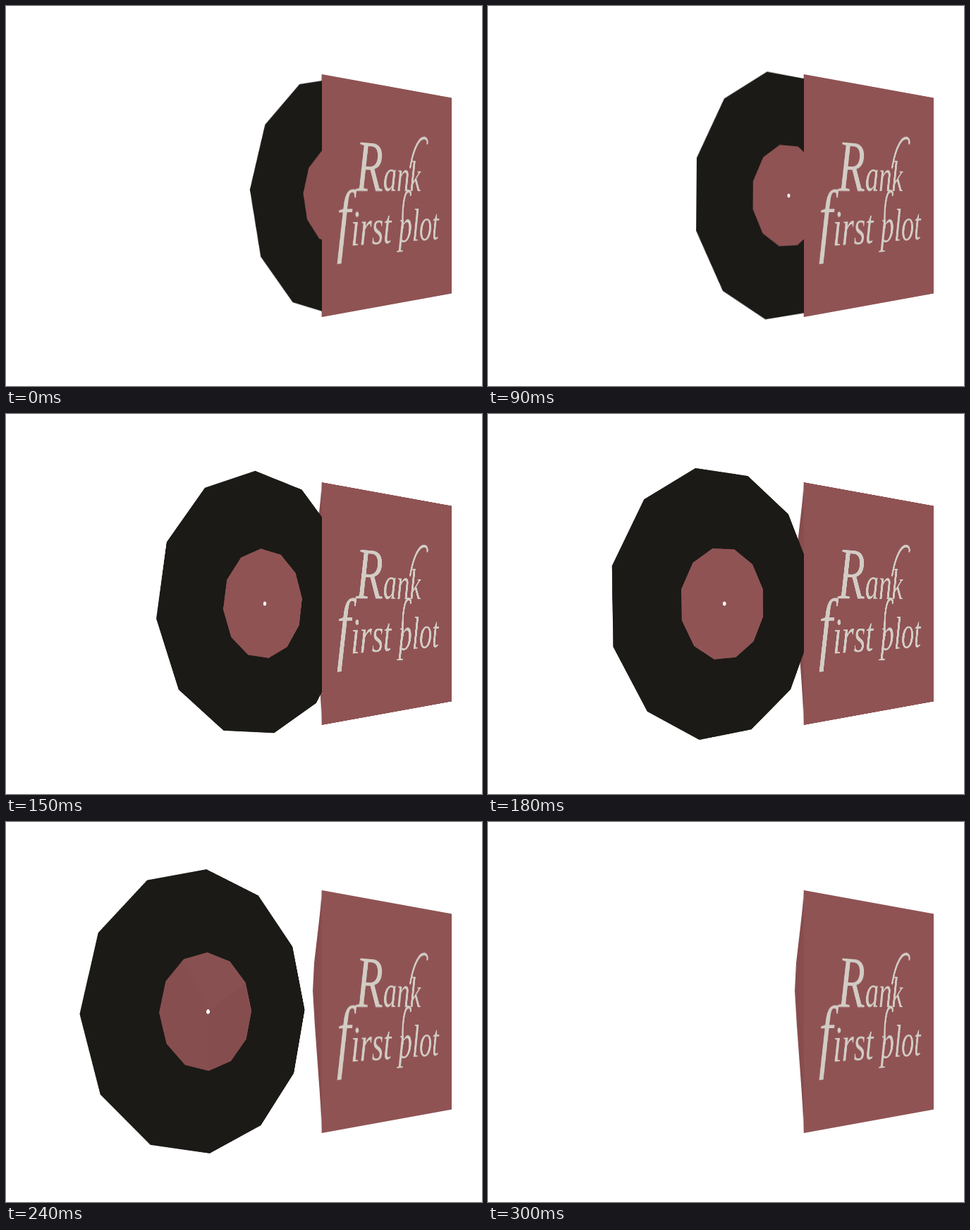
An HTML page that plays this animation: 675x540 px, repeating every 360 ms.

```html
<!DOCTYPE html>
<html lang="en">
<head>
<meta charset="utf-8">
<title>Record sleeve</title>
<style>
  html, body { margin: 0; width: 100%; height: 100%; overflow: hidden; background: #fff; }
  svg { position: absolute; left: 0; top: 0; overflow: visible; }
  /* sleeve and record share one square plane seen in perspective */
  #plane {
    transform-origin: 0 0;
    transform: matrix3d(.9749, .1883, 0, .0006986, 0, 1, 0, 0, 0, 0, 1, 0, 448, 97, 0, 1);
  }
  text { font: italic 76px "Liberation Serif", "Times New Roman", serif; fill: #d2ccc4; }
  .swash { fill: none; stroke: #d2ccc4; stroke-width: 4.5; stroke-linecap: round; }
</style>
</head>
<body>
<svg width="675" height="540">
  <path d="M449 97L437 200L435 240L438 290L449 442Z" fill="#884e4f"/>
  <path d="M448 97L441 200L439 240L442 290L448 442" fill="none" stroke="#7f4748" stroke-opacity=".5"/>
</svg>
<svg id="plane" width="345" height="345">
  <g id="disc">
    <polygon id="vinyl" fill="#1b1a16"/>
    <polygon id="label" fill="#8f5354"/>
    <g id="shade"></g>
    <circle r="2.8" fill="#fff"/>
  </g>
  <rect width="345" height="345" fill="#8f5354"/>
  <text x="76" y="165" font-size="72"><tspan style="font-size:112px">R</tspan><tspan style="font-size:72px">ank</tspan></text>
  <path class="swash" d="M218 126C228 92 246 74 262 76Q270 78 268 84"/>
  <text x="32" y="247"><tspan style="font-size:118px">f</tspan>irst plot</text>
  <path class="swash" d="M197 224C195 192 201 166 213 165Q220 165 219 171"/>
</svg>
<script>
  const $ = id => document.getElementById(id);
  const STEP = 30, LOOP = 360, TRAVEL = 9;

  // corners of a regular twelve-sided shape, clockwise from the top
  function corners(r, from = 0, to = 11) {
    const list = [];
    for (let k = from; k <= to; k++) {
      const a = k * Math.PI / 6;
      list.push((r * Math.sin(a)).toFixed(2) + ',' + (-r * Math.cos(a)).toFixed(2));
    }
    return list.join(' ');
  }

  $('vinyl').setAttribute('points', corners(172.5));
  $('label').setAttribute('points', corners(72));
  $('shade').innerHTML = [[0, 1, .11], [1, 4, .07], [4, 8, .13], [8, 12, .1]]
    .map(([a, b, o]) => `<polygon points="0,0 ${corners(72, a, b)}" fill-opacity="${o}"/>`)
    .join('');

  function draw() {
    const step = Math.floor(performance.now() % LOOP / STEP);
    const u = Math.min(step / TRAVEL, 1);
    const s = u * u * (3 - 2 * u);
    const disc = $('disc');
    disc.setAttribute('transform', `translate(${33 - 250 * s} 172.5) rotate(${2.6 - 65.7 * s})`);
    disc.setAttribute('visibility', step > TRAVEL ? 'hidden' : 'visible');
    $('shade').setAttribute('opacity', [0.2, 0.5, 1][step - 7] || 0);
    requestAnimationFrame(draw);
  }
  draw();
</script>
</body>
</html>
```
